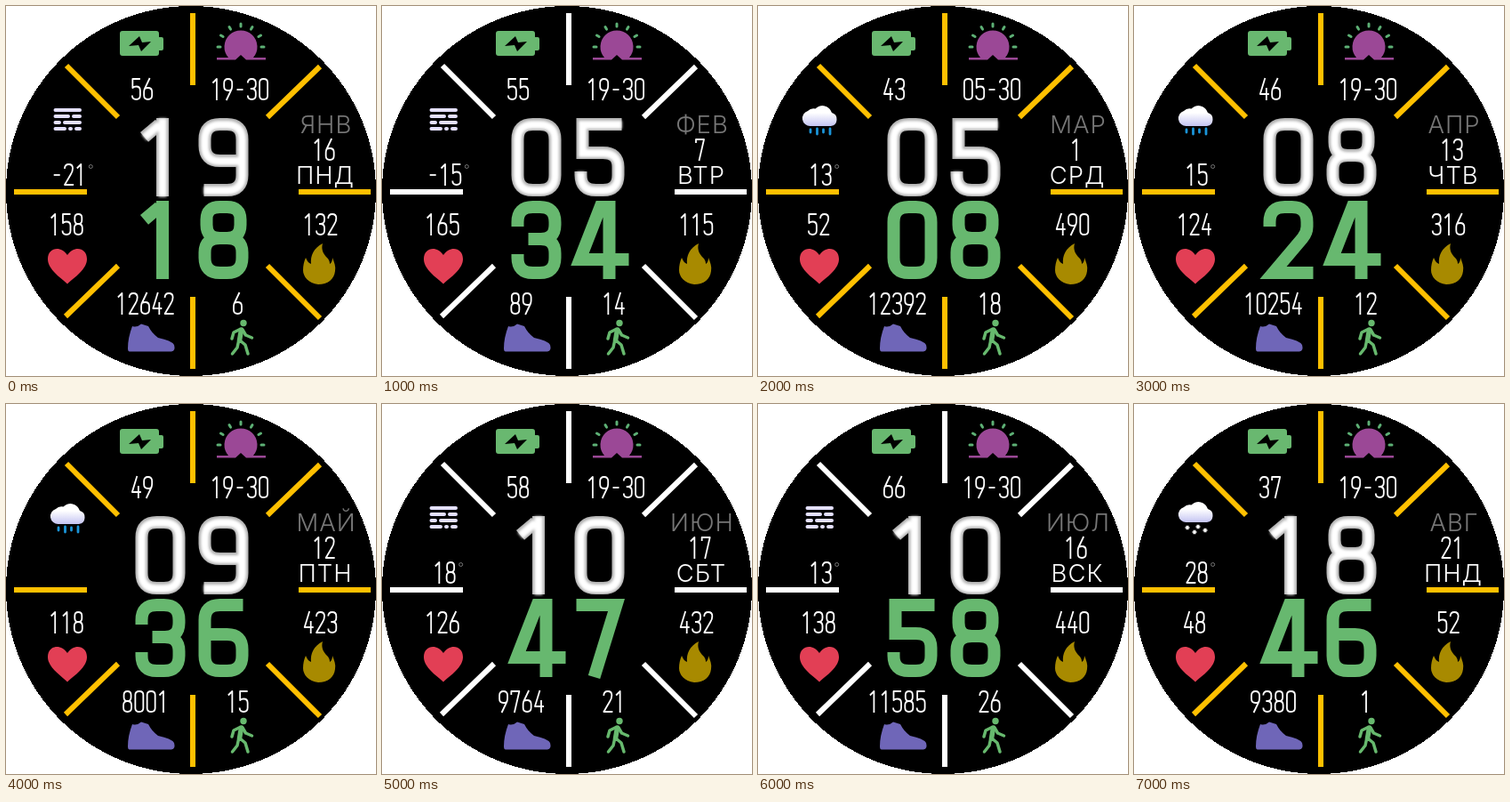
Write an HTML page that moves like this. It is 416 px wide and 416 px high and loops after 8 s.

```html
<!DOCTYPE html>
<html lang="ru">
<head>
<meta charset="utf-8">
<style>
html, body { margin: 0; width: 100%; height: 100%; overflow: hidden; background: #fff; }
svg { display: block; width: 100vw; height: 100vh; }
text { font-family: Inter, "Liberation Sans", sans-serif; font-size: 27.5px; font-weight: 300; letter-spacing: 1px; text-anchor: middle; }
.line { fill: none; stroke-linejoin: round; }
</style>
</head>
<body>
<svg viewBox="0 0 416 416" xmlns="http://www.w3.org/2000/svg">
  <defs>
    <linearGradient id="cloud" x1="0" y1="0" x2="0" y2="1">
      <stop offset=".35" stop-color="#fff"/><stop offset="1" stop-color="#c4c4f2"/>
    </linearGradient>
    <filter id="soft" x="-10%" y="-10%" width="120%" height="120%"><feGaussianBlur stdDeviation="1.6"/></filter>
    <path id="puff" fill="url(#cloud)" d="M59 135A8.700 8.700 0 0 1 56 118A9 9 0 0 1 64.500 115.500A11 11 0 0 1 83 120A7.700 7.700 0 0 1 82 135Z"/>
  </defs>
  <circle cx="208" cy="208" r="208" shape-rendering="crispEdges"/>

  <path id="rays" fill="none" stroke-width="6" d="M210 8V89M210 327V408M9 209H91M329 209H410M68 67L126 125M353 68L294 125M67 349L126 292M353 351L294 292"/>

  <g id="battery">
    <path fill="#69b870" d="M131 28H169Q172 28 172 31V35H175Q177 35 177 37V48Q177 50 175 50H172V53Q172 56 169 56H131Q128 56 128 53V31Q128 28 131 28Z"/>
    <path d="M150 34L138 45L149 44L152 51L163 40L153 41Z"/>
  </g>

  <g id="sun">
    <path fill="#9b4896" d="M237 58H250A18.500 18.500 0 1 1 278 58H292V60.500H270L264 55L258 60.500H237Z"/>
    <path id="beams" class="line" stroke="#5db075" stroke-width="3" stroke-linecap="round"/>
  </g>

  <path fill="#e23f55" d="M69 312.500C61 305 47 296 47 284.500C47 271 62 269 69 280C76 269 91 271 91 284.500C91 296 77 305 69 312.500Z"/>
  <path fill="#a88a00" d="M351 313C340 312 334 304 334 297C334 292 335 287 337 283C339 287 340 289 343 290C342 281 346 272 356 267C354 274 357 279 361 283C363 285 364 287 364 290C366 289 367 286 367 283C369 288 371 293 370 298C369 307 362 313 351 313Z"/>
  <path fill="#6f66b8" d="M142 360Q147 362 152 357.500L160 360Q164 368 171 373Q186 376 189 381Q191 388 186 388.500H139Q137 388.500 137 385Q137 373 142 360Z"/>
  <g id="walker" class="line" stroke="#67b96e" stroke-linecap="round">
    <circle cx="267" cy="356.500" r="3.700" fill="#67b96e" stroke="none"/>
    <path stroke-width="5.500" d="M264.500 364L262.500 376"/>
    <path stroke-width="3.500" d="M263 363.500L256 367L254 374M266 364L269.500 370L276.500 373M263 376L269 381L272 391M261.500 377L260 384L254.500 391"/>
  </g>

  <g id="fog" class="line" stroke="#e4e0ff" stroke-width="4" stroke-linecap="round">
    <path d="M55.500 117H83M55.500 124H70M76 124H83M55.500 131H60M66 131H83M55.500 138H66M72 138H73M79 138H83"/>
  </g>
  <g id="rain">
    <use href="#puff"/>
    <path class="line" stroke="#1a94d8" stroke-width="2.800" stroke-linecap="round" d="M59 139V142M66.500 138V144M73.500 139V142M81 138V144"/>
  </g>
  <g id="snow">
    <use href="#puff" y="-2"/>
    <path id="flakes" class="line" stroke="#fff" stroke-width="1.300"/>
  </g>

  <g id="digits"></g>
  <text id="month" x="360" y="142.500" fill="#777">ЯНВ</text>
  <text id="weekday" x="359" y="200" fill="#fff">ПНД</text>
</svg>
<script>
// Narrow glyphs on a 9 x 23 box
const SMALL = {
  0: 'M0 4Q0 0 4.5 0T9 4V19Q9 23 4.5 23T0 19Z',
  1: 'M.5 4.500L5 0V24',
  2: 'M0 5V4.5Q0 0 4.5 0T9 4.5Q9 8 7 11L0 23H10',
  3: 'M0 4.5Q0 0 4.5 0T9 4.5V6.500Q9 11 4.5 11H3M4.5 11Q9 11 9 15.5V18.5Q9 23 4.5 23T0 18.5',
  4: 'M5.500 -1L0 17H10M7 10V24',
  5: 'M9 0H.5V10Q2 8.500 4.5 8.500Q9 8.500 9 13V18.5Q9 23 4.5 23T0 18.5',
  6: 'M6.500 -1L.8 11Q0 13 0 15V18.5Q0 23 4.5 23T9 18.5V14.5Q9 10 4.5 10T.3 13',
  7: 'M0 4V0H9L3.500 24',
  8: 'M4.5 11Q.5 11 .5 7V4Q.5 0 4.5 0T8.500 4V7Q8.500 11 4.5 11Q0 11 0 15.5V18.5Q0 23 4.5 23T9 18.5V15.5Q9 11 4.5 11',
  9: 'M2.500 24L8.200 12Q9 10 9 8V4.5Q9 0 4.5 0T0 4.5V8.500Q0 13 4.5 13T8.700 10',
  '-': 'M1 12H8'
};
// Wide glyphs on a 42 x 74 box
const BIG = [
  'M17 0H25Q42 0 42 17V57Q42 74 25 74H17Q0 74 0 57V17Q0 0 17 0Z',
  'M3 14.400L20 0M23.500 -7V81',
  'M0 22V17Q0 0 17 0H25Q42 0 42 17V22Q42 29 37 35L4 74H49',
  'M0 22V17Q0 0 17 0H25Q42 0 42 17V20Q42 36 26 36H12M26 36Q42 36 42 52V57Q42 74 25 74H17Q0 74 0 57V53',
  'M54 59H-1L22 0H32V81',
  'M46 0H2V32H25Q42 32 42 48V57Q42 74 25 74H17Q0 74 0 57V53',
  'M43 0H17Q0 0 0 17V57Q0 74 17 74H25Q42 74 42 57V50Q42 33 25 33H0',
  'M-5 0H40L15 81',
  'M17 0H25Q40 0 40 14V20Q40 35 25 35H17Q2 35 2 20V14Q2 0 17 0ZM17 35H25Q42 35 42 51V57Q42 74 25 74H17Q0 74 0 57V51Q0 35 17 35Z',
  'M-1 74H25Q42 74 42 57V17Q42 0 25 0H17Q0 0 0 17V24Q0 41 17 41H42'
];
const PITCH = 13.3, YELLOW = '#ffc000', WHITE = '#fff';
const DAYS = [
  { ray: YELLOW, time: '1918', charge: 56, sun: '19-30', sky: 'fog', temp: '-21', pulse: 158, burn: 132, steps: 12642, walk: 6, month: 'ЯНВ', date: 16, weekday: 'ПНД' },
  { ray: WHITE, time: '0534', charge: 55, sun: '19-30', sky: 'fog', temp: '-15', pulse: 165, burn: 115, steps: 89, walk: 14, month: 'ФЕВ', date: 7, weekday: 'ВТР' },
  { ray: YELLOW, time: '0508', charge: 43, sun: '05-30', sky: 'rain', temp: '13', pulse: 52, burn: 490, steps: 12392, walk: 18, month: 'МАР', date: 1, weekday: 'СРД' },
  { ray: YELLOW, time: '0824', charge: 46, sun: '19-30', sky: 'rain', temp: '15', pulse: 124, burn: 316, steps: 10254, walk: 12, month: 'АПР', date: 13, weekday: 'ЧТВ' },
  { ray: YELLOW, time: '0936', charge: 49, sun: '19-30', sky: 'rain', temp: '', pulse: 118, burn: 423, steps: 8001, walk: 15, month: 'МАЙ', date: 12, weekday: 'ПТН' },
  { ray: WHITE, time: '1047', charge: 58, sun: '19-30', sky: 'fog', temp: '18', pulse: 126, burn: 432, steps: 9764, walk: 21, month: 'ИЮН', date: 17, weekday: 'СБТ' },
  { ray: WHITE, time: '1058', charge: 66, sun: '19-30', sky: 'fog', temp: '13', pulse: 138, burn: 440, steps: 11585, walk: 26, month: 'ИЮЛ', date: 16, weekday: 'ВСК' },
  { ray: YELLOW, time: '1846', charge: 37, sun: '19-30', sky: 'snow', temp: '28', pulse: 48, burn: 52, steps: 9380, walk: 1, month: 'АВГ', date: 21, weekday: 'ПНД' }
];

const $ = id => document.getElementById(id);

const star = (x, y) => `M${x - 2.5} ${y}h5M${x - 1.2} ${y - 2.2}l2.4 4.4M${x + 1.2} ${y - 2.2}l-2.4 4.4`;
$('flakes').setAttribute('d', star(60, 139) + star(72, 138) + star(68, 144) + star(80, 142));

// Seven beams fanned over the upper half of the sun
function beam(i) {
  const a = Math.PI * i / 6, at = r => `${264 - r * Math.cos(a)} ${46 - r * Math.sin(a)}`;
  return `M${at(23)}L${at(26)}`;
}
$('beams').setAttribute('d', [0, 1, 2, 3, 4, 5, 6].map(beam).join(''));

// Row of narrow digits centred on cx, with its top edge at y
function row(value, cx, y) {
  const s = String(value);
  const left = cx - ((s.length - 1) * PITCH + 9) / 2;
  const marks = [...s].map((c, i) =>
    `<path transform="translate(${left + i * PITCH} ${y + 1})" d="${SMALL[c]}"/>`);
  return `<g class="line" stroke="#fff" stroke-width="1.8" role="img" aria-label="${s}">${marks.join('')}</g>`;
}

function pair(s, y, color, width, extra = '') {
  return `<g fill="none" stroke="${color}" stroke-width="${width}" ${extra}>` +
    [...s].map((c, i) => `<path transform="translate(${152.5 + i * 71} ${y})" d="${BIG[c]}"/>`).join('') + '</g>';
}

function degree(temp) {
  if (!temp) return '';
  const x = 70.5 + (temp.length - 1) * PITCH / 2 + 11.5;
  return `<circle cx="${x}" cy="180.500" r="2" fill="none" stroke="#777" stroke-width="1"/>`;
}

let shown = -1;
function draw(ms) {
  const n = Math.floor(ms / 1000) % DAYS.length;
  if (n === shown) return;
  shown = n;
  const d = DAYS[n];
  $('rays').setAttribute('stroke', d.ray);
  for (const id of ['fog', 'rain', 'snow']) $(id).style.display = id === d.sky ? '' : 'none';
  $('month').textContent = d.month;
  $('weekday').textContent = d.weekday;
  const hours = d.time.slice(0, 2), minutes = d.time.slice(2);
  $('digits').innerHTML =
    pair(hours, 133, '#b0b0b0', 14) +
    pair(hours, 133.5, '#fff', 9, 'filter="url(#soft)"') +
    pair(minutes, 226, '#67b86f', 14) +
    row(d.charge, 153, 81) + row(d.sun, 263, 81) +
    row(d.temp, 70.5, 177) + degree(d.temp) +
    row(d.date, 357.5, 149) +
    row(d.pulse, 68, 233) + row(d.burn, 353.5, 233) +
    row(d.steps, 156.5, 322) + row(d.walk, 260.5, 322);
}

const start = performance.now();
function tick() {
  draw(performance.now() - start);
  requestAnimationFrame(tick);
}
tick();
</script>
</body>
</html>
```
